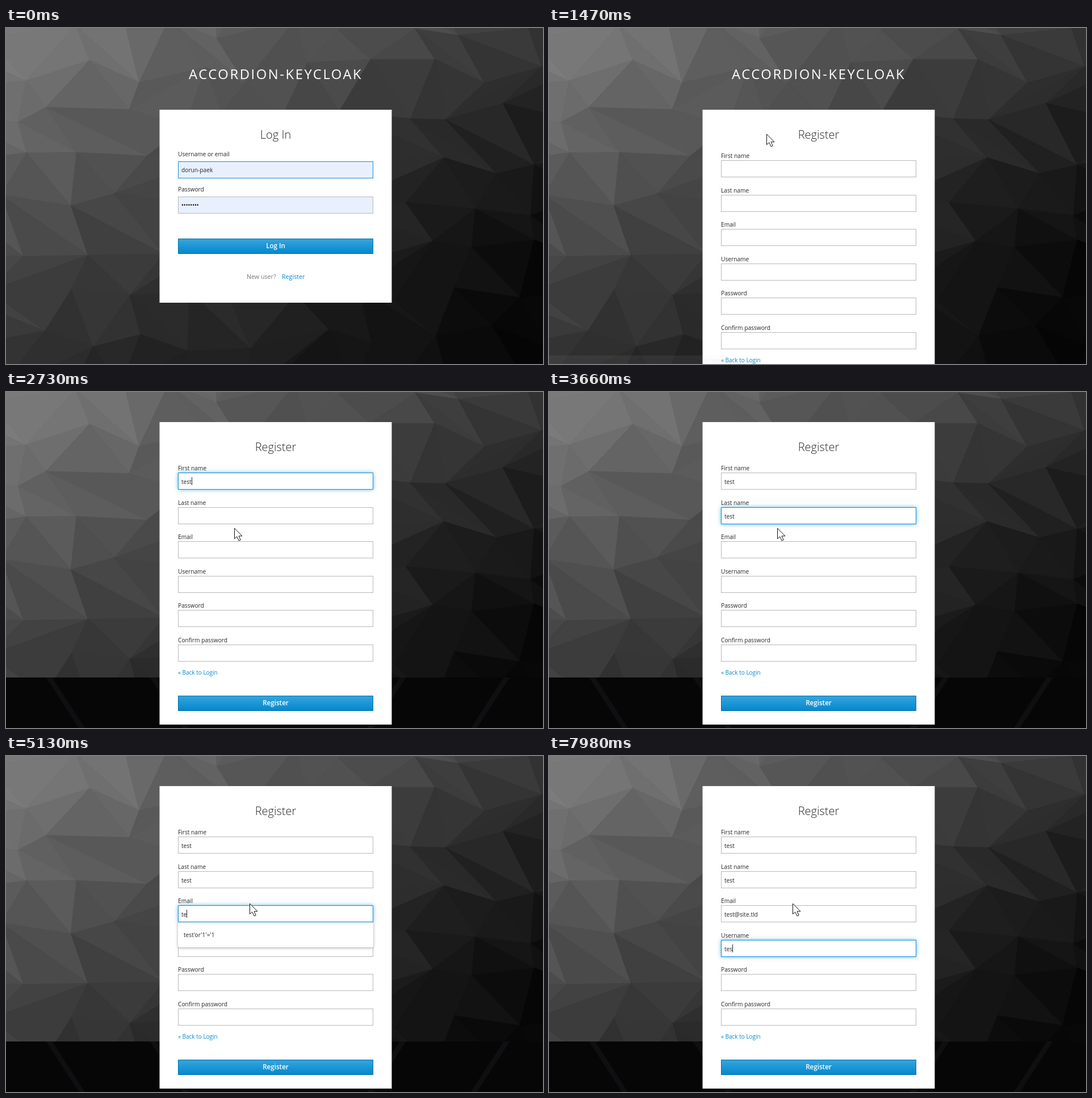
Animation, 946 px wide and 592 px high, one loop 8 s. Source, as an HTML page with a canvas:

```html
<!DOCTYPE html>
<html lang="en">
<head>
<meta charset="utf-8">
<title>Registration form</title>
<style>
  html, body { margin: 0; width: 100%; height: 100%; overflow: hidden; background: #060606; }
  canvas { display: block; }
</style>
</head>
<body>
<canvas id="stage" width="946" height="592"></canvas>
<script>
const W = 946, H = 592, LOOP = 8000;
const CENTER = 475, LEFT = 303, WIDTH = 344;
const LINK = '#0088ce';
const ctx = document.getElementById('stage').getContext('2d');
const clamp = v => Math.max(0, Math.min(1, v));
const ramp = (t, start, length) => clamp((t - start) / length);
const mix = (a, b, k) => a + (b - a) * k;
const between = (t, a, b) => t >= a && t < b;

// Seeded noise in 0..1
function noise(a, b) {
  const n = Math.sin(a * 12.99 + b * 78.23) * 43758.5;
  return n - Math.floor(n);
}

// Light top left, black bottom right
function shade(x, y) {
  const u = clamp(x / W), v = clamp(y / H);
  const base = mix(mix(128, 56, u), mix(48, 4, u), v) - 12 * u * Math.sin(Math.PI * v);
  const level = Math.max(3, Math.round(base + 9 * (noise(x, y) - .5)));
  return `rgb(${level},${level},${level})`;
}

// Low-poly backdrop: a jittered grid whose cells are split along a random diagonal
function makeBackdrop() {
  const layer = document.createElement('canvas');
  layer.width = W;
  layer.height = H;
  const g = layer.getContext('2d');
  const stepX = 100, stepY = 78;
  const node = (i, j) => [
    (i + (j % 2) / 2 + .6 * (noise(i, j) - .5)) * stepX,
    (j + .6 * (noise(j + 9, i) - .5)) * stepY
  ];
  const triangle = (...corners) => {
    const mean = axis => corners.reduce((sum, p) => sum + p[axis], 0) / 3;
    g.fillStyle = g.strokeStyle = shade(mean(0), mean(1));
    g.beginPath();
    corners.forEach(p => g.lineTo(...p));
    g.closePath();
    g.fill();
    g.stroke();
  };
  for (let j = -1; j * stepY < H + stepY; j++) {
    for (let i = -1; i * stepX < W + stepX; i++) {
      const a = node(i, j), b = node(i + 1, j), c = node(i + 1, j + 1), d = node(i, j + 1);
      if (noise(i + 5, j) < .5) { triangle(a, b, c); triangle(a, c, d); }
      else { triangle(a, b, d); triangle(b, c, d); }
    }
  }
  return layer;
}
const backdrop = makeBackdrop();

function text(str, x, y, { size = 10.2, weight = 400, color = '#262626', align = 'left', spacing = 0 } = {}) {
  ctx.font = `${weight} ${size}px "Open Sans", sans-serif`;
  ctx.letterSpacing = spacing + 'px';
  ctx.textAlign = align;
  ctx.fillStyle = color;
  ctx.fillText(str, x, y);
  return ctx.measureText(str).width;
}

function box(y, height, fill, border) {
  ctx.fillStyle = fill;
  ctx.fillRect(LEFT, y, WIDTH, height);
  ctx.shadowBlur = 0;
  ctx.strokeStyle = border;
  ctx.lineWidth = 1;
  ctx.strokeRect(LEFT + .5, y + .5, WIDTH - 1, height - 1);
}

function input(y, { focus = 0, fill = '#fff', glow = 7 } = {}) {
  box(y, 30, fill, '#b8b8b8');
  if (focus <= 0) return;
  ctx.save();
  ctx.globalAlpha = focus;
  ctx.shadowColor = 'rgba(0,136,206,.6)';
  ctx.shadowBlur = glow;
  box(y, 30, fill, '#0f8fd2');
  ctx.restore();
}

function button(label, y) {
  const g = ctx.createLinearGradient(0, y, 0, y + 27);
  g.addColorStop(0, '#39a5dc');
  g.addColorStop(1, LINK);
  box(y, 27, g, '#006fab');
  text(label, CENTER, y + 17, { size: 11.6, weight: 600, color: '#fff', align: 'center' });
}

function card(heading, height) {
  ctx.fillStyle = '#fff';
  ctx.fillRect(270.5, 144, 409, height);
  text(heading, CENTER, 195, { size: 20, weight: 300, align: 'center' });
}

function drawLogin(t) {
  const fill = '#e8f0fe';
  card('Log In', 340);
  text('Username or email', LEFT, 226);
  input(235, { focus: t < 800 ? 1 : 0, fill, glow: 0 });
  text('dorun-paek', 309, 254);
  text('Password', LEFT, 288);
  input(297, { fill });
  text('••••••••', 309, 316, { color: '#000' });
  button('Log In', 371);
  text('New user?', 424, 442, { size: 10.7, color: '#72767b' });
  const width = text('Register', 486, 442, { size: 10.7, color: LINK });
  if (t >= 870) ctx.fillRect(486, 443, width, 1);
}

// Each burst of typing starts at a given time and adds a character every PACE ms
const PACE = 90;
const fields = [
  { label: 'First name', focus: 1740, bursts: [[2310, 'test']] },
  { label: 'Last name', focus: 2790, bursts: [[2970, 'test']] },
  { label: 'Email', focus: 4260, bursts: [[5040, 'test'], [5430, '@'], [6120, 'site.'], [6780, 'tld']] },
  { label: 'Username', focus: 7200, bursts: [[7560, 'te'], [7970, 's']] },
  { label: 'Password', focus: LOOP, bursts: [] },
  { label: 'Confirm password', focus: LOOP, bursts: [] }
];
const fieldTop = i => Math.round(233 + 60.5 * i);
const typedText = (bursts, t) =>
  bursts.map(([start, str]) => str.slice(0, Math.max(0, Math.floor((t - start) / PACE) + 1))).join('');

const injected = "test'or'1'='1";
const menus = [
  { field: 0, from: 2310, to: 2640, items: ['test'] },
  { field: 1, from: 2970, to: 3600, items: ['test'] },
  { field: 2, from: 4320, to: 5040,
    items: [injected, "test'or'1'", 'nobody_@host.tld', "1'or'test1234", 'noone@host.tld', 'test'] },
  { field: 2, from: 5040, to: 5430, items: [injected] }
];
const caretHidden = t => between(t, 3600, 4260) || between(t, 5640, 5940);

function drawField({ label, focus, bursts }, i, t) {
  const y = fieldTop(i);
  const blur = i + 1 < fields.length ? fields[i + 1].focus : LOOP;
  text(label, LEFT, y - 4.5);
  input(y, { focus: ramp(t, focus, 120) - ramp(t, blur, 120) });
  const width = text(typedText(bursts, t), 309, y + 19.5);
  if (between(t, focus, blur) && !caretHidden(t)) {
    ctx.fillStyle = '#222';
    ctx.fillRect(Math.round(309 + width), y + 8, 1, 14);
  }
}

function drawMenu({ field, items }) {
  const y = fieldTop(field) + 30;
  ctx.save();
  ctx.shadowColor = 'rgba(0,0,0,.35)';
  ctx.shadowBlur = 5;
  ctx.shadowOffsetY = 1;
  ctx.fillStyle = '#fff';
  ctx.beginPath();
  ctx.roundRect(LEFT, y, WIDTH, 15 + 29 * items.length, 2);
  ctx.fill();
  ctx.restore();
  items.forEach((item, i) => text(item, 313, y + 26 + 29 * i));
}

function drawRegister(t) {
  card('Register', 533);
  fields.forEach((field, i) => drawField(field, i, t));
  text('« Back to Login', LEFT, 589, { size: 10, color: LINK });
  button('Register', 626);
  menus.filter(m => between(t, m.from, m.to)).forEach(drawMenu);
}

function drawUnderlay() {
  ctx.fillStyle = '#060606';
  ctx.fillRect(0, 0, W, H);
  ctx.lineWidth = 9;
  ctx.strokeStyle = '#0f0f12';
  for (const side of [-1, 1]) for (const reach of [222, 405]) {
    ctx.beginPath();
    ctx.moveTo(479 + side * reach, 500);
    ctx.lineTo(479 + side * (reach - 61), 594);
    ctx.stroke();
  }
}

function drawStatus(t) {
  ctx.save();
  ctx.globalAlpha = ramp(t, 870, 150) * (1 - ramp(t, 1260, 225));
  ctx.fillStyle = '#dee1e6';
  ctx.beginPath();
  ctx.roundRect(-4, 577, 319, 20, 3);
  ctx.fill();
  text('127.0.0.1:8081/auth/realms/accordion-keycloak/.../registration?client...', 2, 589,
    { size: 9.7, color: '#111' });
  ctx.restore();
}

// Pointer moves: start, duration and destination
const moves = [
  { start: 30, length: 420, x: 583, y: 157 },
  { start: 450, length: 360, x: 515, y: 440 },
  { start: 1170, length: 270, x: 383, y: 187 },
  { start: 1500, length: 210, x: 380, y: 245 },
  { start: 1800, length: 180, x: 424, y: 219 },
  { start: 2100, length: 360, x: 402, y: 240 },
  { start: 4110, length: 750, x: 429, y: 260 }
];
const arrow = new Path2D('M.5 0V18.5L4.8 14.8L8.2 22L11.2 20.6L8 13.8H14Z');
const hand = new Path2D('M-2.5 2Q0-1.5 2.2 2V9.5L6.5 10.5Q10.8 11.5 10.6 15L9.8 20Q8.5 25 2.5 25'
  + 'Q-2.5 25-4.5 21.5L-9 16Q-9.5 12.5-6 13.5L-2.5 16Z M2.2 9.5V14 M5.2 10.5V14.5 M8 11.5V15');

function drawPointer(t) {
  if (t < moves[0].start) return;
  let x = 918, y = 22;
  for (const move of moves) {
    const k = ramp(t, move.start, move.length);
    x = mix(x, move.x, k);
    y = mix(y, move.y, k);
  }
  const shape = between(t, 790, 1200) ? hand : arrow;
  ctx.save();
  ctx.translate(x, y);
  ctx.fillStyle = '#fff';
  ctx.strokeStyle = '#111';
  ctx.lineWidth = 1;
  ctx.fill(shape);
  ctx.stroke(shape);
  ctx.restore();
}

function draw(t) {
  const scroll = Math.round(91 * (1 - (1 - ramp(t, 1890, 175)) ** 2));
  const visible = 594 - scroll;
  drawUnderlay();
  ctx.save();
  ctx.beginPath();
  ctx.rect(0, 0, W, visible);
  ctx.clip();
  ctx.drawImage(backdrop, 0, 0);
  ctx.restore();

  ctx.save();
  ctx.translate(0, -scroll);
  text('ACCORDION-KEYCLOAK', 322, 90, { size: 23.8, color: '#fff', spacing: 2.55 });
  if (t < 1170) drawLogin(t);
  else drawRegister(t);
  ctx.restore();

  drawStatus(t);
  drawPointer(t);
}

const startTime = performance.now();
function tick() {
  draw((performance.now() - startTime) % LOOP);
  requestAnimationFrame(tick);
}
tick();
</script>
</body>
</html>
```
